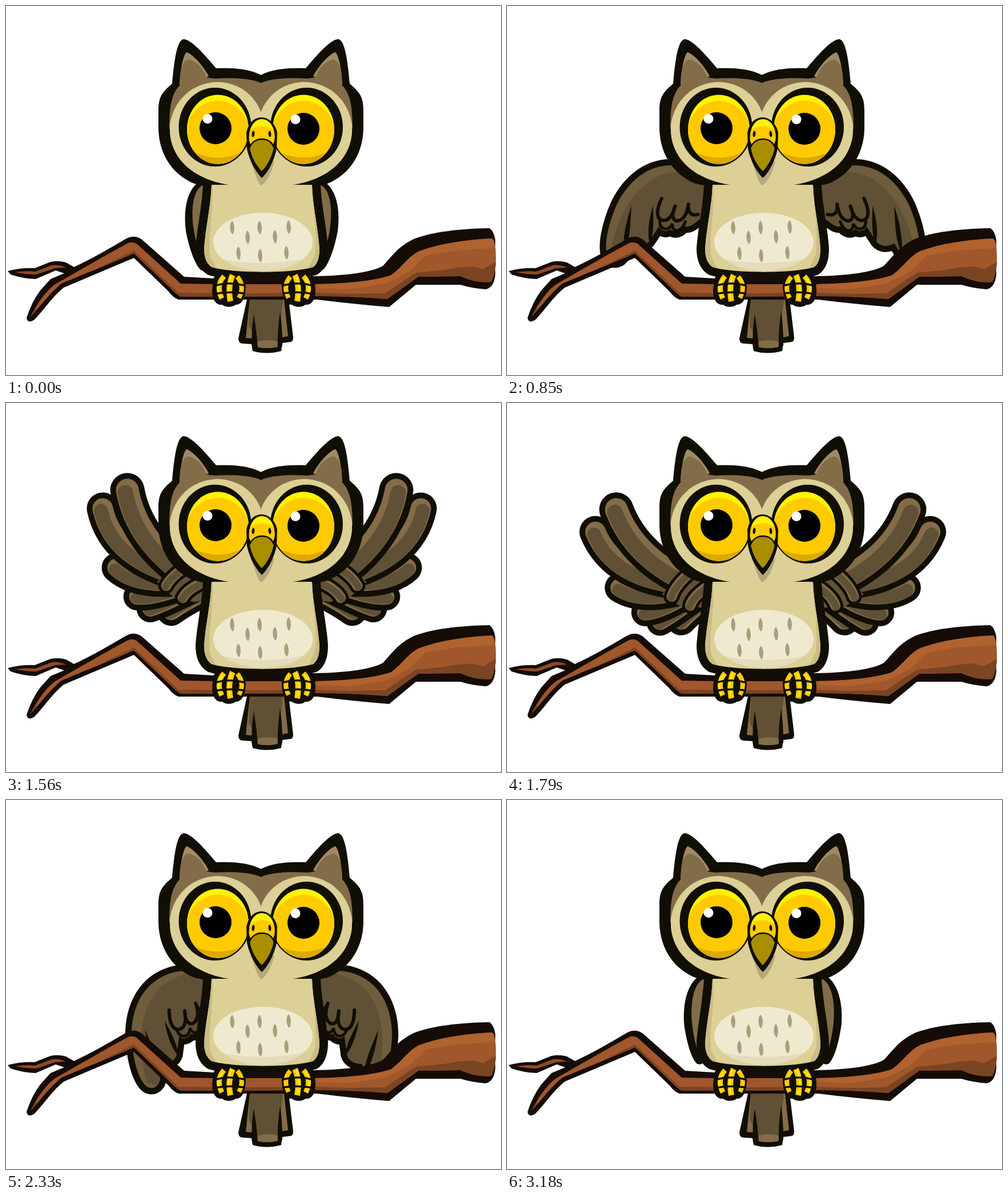
Animation, 867 px wide and 646 px high, one loop 3.42 s. Source, as an HTML page with a canvas:

```html
<!DOCTYPE html>
<html lang="en">
<head>
<meta charset="utf-8">
<title>Owl on a branch</title>
<style>
html, body { margin: 0; width: 100%; height: 100%; overflow: hidden; background: #fff; }
canvas { display: block; width: 867px; height: 646px; }
</style>
</head>
<body>
<canvas id="stage" width="867" height="646"></canvas>
<script>
const ctx = document.getElementById('stage').getContext('2d');
const LOOP = 3420;
const INK = '#110e05', BRANCH_INK = '#150c07';
const BROWN = '#836c48', DARK = '#605136', MID = '#6f5d3d';
const CREAM = '#dcd096', SHADE = '#cabc83', AMBER = '#ffcb00', YELLOW = '#fff200';

// start time, wing shape, wing angle (positive lifts a lowered wing)
const POSES = [
  [0, 'folded', -8], [370, 'lowered', -14], [450, 'lowered', 0],
  [850, 'lowered', 12], [1000, 'raised', -7.7], [1080, 'raised', 0],
  [1320, 'raised', -7.7], [1400, 'raised', 0], [1560, 'raised', -7.7],
  [1640, 'raised', -14], [1790, 'raised', -18], [1950, 'lowered', 18],
  [2100, 'lowered', 12], [2180, 'lowered', 0], [2330, 'lowered', -14],
  [2490, 'folded', 6], [2560, 'folded', 0], [3030, 'folded', -2.5],
  [3180, 'folded', -4.5]
];

function fill(path, color) {
  ctx.fillStyle = color;
  ctx.fill(new Path2D(path));
}

function line(path, width, color = INK) {
  ctx.lineWidth = width;
  ctx.strokeStyle = color;
  ctx.stroke(new Path2D(path));
}

function oval(x, y, rx, ry, color, tilt = 0) {
  ctx.fillStyle = color;
  ctx.beginPath();
  ctx.ellipse(x, y, rx, ry, tilt, 0, 7);
  ctx.fill();
}

function clipped(path, draw) {
  ctx.save();
  ctx.clip(new Path2D(path));
  draw();
  ctx.restore();
}

// Draws once as given and once mirrored about the vertical line x = axis.
function both(axis, draw) {
  draw();
  ctx.save();
  ctx.translate(2 * axis, 0);
  ctx.scale(-1, 1);
  draw();
  ctx.restore();
}

function feather(rx, ry, cx, cy, tx, ty, width, edge = 10) {
  const path = `M${rx} ${ry}Q${cx} ${cy} ${tx} ${ty}`;
  line(path, width + 2 * edge);
  line(path, width, BROWN);
  ctx.save();
  ctx.translate(-width / 10, width / 10);
  line(path, width * 0.68, DARK);
  ctx.restore();
}

const WINGS = {
  folded: {
    pivot: [350, 312],
    draw() {
      fill('M352 302C320 306 304 345 304 390C306 425 313 452 321 460C330 465 337 456 342 440L358 340Z', INK);
      fill('M350 312C328 312 317 350 318 390C319 415 322 432 326 442C332 420 339 380 342 345Z', BROWN);
      fill('M346 316C334 345 338 390 326 442C333 430 340 380 347 340Z', DARK);
    }
  },
  lowered: {
    pivot: [345, 320],
    draw() {
      const shape = 'M352 305C325 290 305 288 285 291C240 298 212 335 201 380C194 415 193 455 205 472C214 482 229 478 233 460L240 440C255 444 268 440 272 425L282 400C285 408 297 409 302 401C311 407 320 402 324 391C333 393 340 385 352 370Z';
      line(shape, 22);
      fill(shape, MID);
      clipped(shape, () => fill('M360 300C300 292 262 302 235 345C213 382 207 420 207 465L245 490L360 410Z', DARK));
      line('M276 352C270 376 275 390 287 389C297 387 301 376 302 360C298 378 304 388 313 384C323 379 325 367 324 352C325 366 333 372 344 366', 6);
      line('M281 390C282 405 298 408 303 393M304 393C307 407 322 404 325 383', 5);
      fill('M227 375C223 408 224 435 231 460C238 435 231 405 227 375Z', INK);
      fill('M264 368C261 395 265 420 272 434C276 415 270 392 264 368Z', INK);
    }
  },
  raised: {
    pivot: [390, 286],
    draw() {
      feather(340, 325, 302, 338, 280, 350, 32);
      feather(330, 315, 270, 336, 244, 341, 28);
      feather(325, 305, 255, 325, 224, 317, 28);
      feather(320, 300, 228, 302, 195, 262, 32);
      feather(315, 295, 192, 248, 185, 156, 36);
      feather(325, 300, 236, 224, 232, 130, 40);
      fill('M290 280L360 270V338L322 340L288 328L262 296Z', DARK);
      feather(335, 270, 292, 284, 277, 305, 18, 5);
      feather(352, 305, 314, 314, 303, 330, 18, 5);
    }
  }
};

function drawWings(name, angle) {
  const { pivot: [x, y], draw } = WINGS[name];
  both(448, () => {
    ctx.save();
    ctx.translate(x, y);
    ctx.rotate(angle * Math.PI / 180);
    ctx.translate(-x, -y);
    draw();
    ctx.restore();
  });
}

function drawTail() {
  fill('M424 505L407 582Q407 591 415 591L430 592L432 604Q456 611 482 604L484 590L499 588Q503 587 503 580L494 505Z', INK);
  fill('M427 514L420 581L431 582L435 545L437 514Z', BROWN);
  fill('M487 514L494 578L484 580L480 545L478 514Z', BROWN);
  fill('M427 514H485L480 560L432 572L425 560Z', DARK);
  fill('M437 530H477L479 575L476 597Q456 601 439 597Z', DARK);
  fill('M439 588Q460 582 477 588L475 597Q456 601 440 597Z', BROWN);
  fill('M434 540Q429 570 431 600L441 598Q439 570 434 540Z', INK);
  fill('M480 535Q475 570 476 598L484 595Q484 560 480 535Z', INK);
}

function drawBranch() {
  fill('M3 464Q26 458 50 459L78 448Q91 445 105 449L119 457C150 443 180 425 211 407Q224 400 237 408L312 474L365 477L540 473C600 472 640 466 660 455C675 440 685 422 714 408C745 396 790 390 847 389Q855 395 857 410L857 470Q855 493 840 496Q815 494 796 488H718L671 527Q610 522 545 514L302 514Q292 510 285 500L224 441L101 493C80 510 70 528 50 549Q38 557 36 546Q45 518 60 498L78 478L102 468L87 463L52 478Q28 477 8 470Z', BRANCH_INK);
  const wood = 'M43 544C55 520 72 496 88 486C130 462 175 436 214 415Q225 411 233 420L306 486L365 487L540 487C605 486 650 480 675 471C695 456 705 438 724 429C760 416 805 409 851 407Q858 410 858 440Q859 465 850 483Q824 486 796 473L722 474L668 513Q605 508 545 508L365 509L306 509Q296 503 288 494L224 433C180 452 130 472 97 486C75 504 60 526 43 544Z';
  fill(wood, '#a0572b');
  clipped(wood, () => {
    fill('M30 560L92 493L224 428L302 502L420 503L540 502L600 504L664 503L692 484L718 467L768 462L791 458L818 456L835 461L860 447V530H30Z', '#7b4422');
    fill('M545 480L660 470L720 424L855 400V424L790 428L735 437L705 466L665 486L600 496L545 494Z', '#b0622f');
  });
  fill('M16 466Q36 463 51 465L80 454Q92 452 105 458L86 459L53 470Q34 470 16 466Z', '#8d4b26');
}

function drawFoot() {
  fill('M363 479C366 467 383 465 395 467C411 466 420 478 420 492C419 511 414 523 402 523C396 528 384 528 379 523C366 524 361 512 361 497Z', INK);
  ctx.lineCap = 'butt';
  line('M382 473Q367 489 378 512', 9, AMBER);
  line('M397 471Q388 490 393 517', 10, AMBER);
  line('M405 474Q419 490 408 511', 8, AMBER);
  line('M380 476Q366 490 376 510M395 473Q387 490 392 514', 3, '#ffe52b');
  ctx.lineCap = 'round';
  line('M365 490Q390 482 417 489M365 504Q390 499 417 503', 3.5);
}

function drawBody() {
  const trunk = 'M360 313C359 350 349 390 347 425Q347 448 360 457C395 468 500 469 538 457Q549 449 549 425C547 390 537 350 536 313Z';
  line(trunk, 30);
  return () => {
    fill(trunk, CREAM);
    clipped(trunk, () => {
      fill('M361 310C365 360 352 410 358 440L372 466L335 470V310Z', SHADE);
      fill('M535 310C537 350 546 400 541 435L526 467L560 470V310Z', SHADE);
      oval(450, 413, 87, 51, '#e4dcba');
      clipped('M350 350H550V436Q450 464 350 436Z', () => oval(450, 413, 87, 51, '#efe9d0'));
    });
    const spots = [[396, 388], [444, 388], [495, 387], [423, 405], [471, 404], [407, 433], [445, 437], [491, 432]];
    for (const [x, y] of spots) {
      fill(`M${x} ${y - 12}C${x + 5} ${y - 7} ${x + 5} ${y + 8} ${x + 1} ${y + 12}C${x - 5} ${y + 7} ${x - 5} ${y - 8} ${x} ${y - 12}Z`, '#a9a078');
    }
  };
}

function drawHead() {
  both(446.5, () => {
    fill('M447 121C425 110 400 108 368 109C350 88 326 59 311 58C300 60 295 90 291 136C272 152 267 160 267 185V215C268 263 295 297 330 311C355 317 380 318 405 316H447Z', INK);
  });
}

function drawEye(x, ringX) {
  oval(ringX, 212, 63.5, 69, INK);
  ctx.save();
  ctx.beginPath();
  ctx.ellipse(x, 216, 54, 60.5, 0, 0, 7);
  ctx.clip();
  oval(x, 216, 55, 62, YELLOW);
  oval(x, 226, 56, 60, AMBER);
  fill(`M${x - 60} 245Q${x} 286 ${x + 60} 245V290H${x - 60}Z`, '#dca900');
  ctx.restore();
}

function drawPupil(x, y) {
  oval(x, y, 28, 28, '#000');
  oval(x - 14, y - 16.5, 8.5, 8.5, '#fff');
}

function drawFace() {
  both(446.5, () => {
    fill('M304 138C305 110 311 85 316 81C326 83 346 105 355 123L340 130Z', '#a08a65');
    fill('M447 135C430 127 400 125 365 127L351 125C346 112 338 99 322 94C311 92 303 112 305 138C290 153 286 175 286 215H447Z', BROWN);
    fill('M447 187C436 156 408 134 371 133C325 134 293 166 287 208V222C290 265 325 307 405 315L447 318Z', CREAM);
  });
  fill('M428 272C435 285 439 308 447 314C457 308 465 292 470 272Z', '#b4a87c');
  drawEye(371, 366);
  drawEye(521, 526.5);
  drawPupil(367, 214);
  drawPupil(521, 215);
  drawBeak();
}

function drawBeak() {
  fill('M421 222C425 202 437 195 448 195C462 196 472 207 475 222L474 250C469 273 458 292 448 301C438 291 427 273 422 250Z', INK);
  const cap = 'M426 236C424 213 435 198 448 198C462 198 473 214 470 236L466 246H430Z';
  fill(cap, YELLOW);
  clipped(cap, () => fill('M422 226C430 206 465 205 474 226V250H422Z', AMBER));
  oval(433, 224, 2.4, 5.5, INK, 0.1);
  oval(462, 224, 2.4, 5.5, INK, -0.1);
  fill('M427 248C430 237 440 233 448 233C457 233 466 237 469 248C465 267 456 281 448 289C439 280 430 266 427 248Z', '#a98e00');
  line('M427 247C431 237 440 233 448 233C457 233 465 237 469 247', 2.5);
}

function render(wing, angle) {
  ctx.fillStyle = '#fff';
  ctx.fillRect(0, 0, 867, 646);
  ctx.lineCap = ctx.lineJoin = 'round';
  drawTail();
  drawWings(wing, angle);
  const paintBody = drawBody();
  drawBranch();
  drawHead();
  paintBody();
  drawFace();
  both(451.5, drawFoot);
}

let shown;
function tick() {
  const time = performance.now() % LOOP;
  const pose = POSES.findLast(([start]) => start <= time);
  if (pose !== shown) {
    shown = pose;
    render(pose[1], pose[2]);
  }
  requestAnimationFrame(tick);
}
tick();
</script>
</body>
</html>
```
